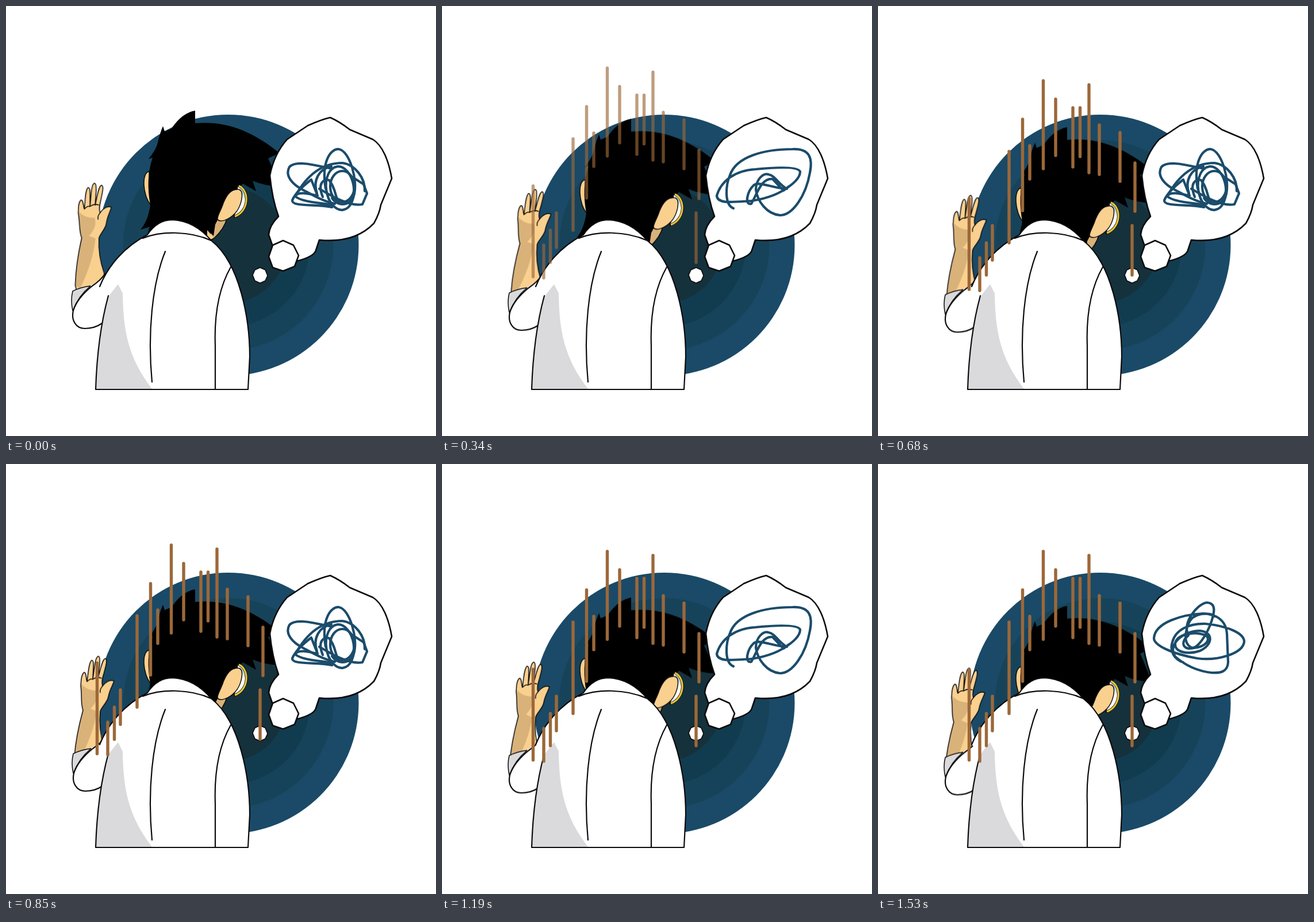
Animation of 748x748 px, one loop 1700 ms. Source, as an HTML page:

```html
<!DOCTYPE html>
<html lang="en">
<head>
<meta charset="utf-8">
<title>Confused thoughts</title>
<style>
  html, body { margin: 0; width: 100%; height: 100%; overflow: hidden; background: #fff; }
  svg { display: block; width: 100%; height: 100%; }
  .ink { stroke: #0b0b0d; stroke-width: 2.2; stroke-linecap: round; stroke-linejoin: round; }
  .thin { stroke-width: 1.5; }
  .skin { fill: #fad08f; }
  .shade { fill: #d9b27a; }
  .grey { fill: #dadadc; }
  .white { fill: #fff; }
  .open { fill: none; }
  .bubble { fill: #fff; stroke-width: 2.6; }
  .dot { stroke-width: 1.6; }
  .rim { stroke-width: 4.6; }
  .scribble { fill: none; stroke: #1b4c6b; stroke-width: 4.2; stroke-linecap: round; stroke-linejoin: round; opacity: 0; }
  .rain { stroke: #9c6839; stroke-width: 5.4; stroke-linecap: round; }

  .head, .sleeve, .forearm, .rain, .scribble { animation: 1700ms infinite; }
  .head { animation-name: sink; animation-timing-function: steps(10); }
  .sleeve { animation-name: sag; }
  .forearm { animation-name: slide; transform-origin: 145px 490px; }
  .rain { animation-name: fall, appear; }
  .scribble { animation-timing-function: step-end; }
  .knot { animation-name: knot; }
  .orbit { animation-name: orbit; }
  .loop { animation-name: loop; }
  .swirl { animation-name: swirl; }

  @keyframes sink { to { transform: translateY(72px); } }
  @keyframes sag {
    0% { transform: none; animation-timing-function: step-end; }
    10% { transform: translate(1px, 1.5px); animation-timing-function: steps(9); }
    100% { transform: translate(1px, 16px); }
  }
  @keyframes slide {
    0% { transform: translate(-.5px, -5px) rotate(-2.7deg); animation-timing-function: step-end; }
    10% { transform: translate(0, 0) rotate(0deg); animation-timing-function: steps(9); }
    100% { transform: translate(-4.8px, 46px) rotate(0deg); }
  }
  @keyframes fall {
    0% { transform: translateY(0); animation-timing-function: step-end; }
    10% { transform: translateY(0); animation-timing-function: steps(5); }
    60%, 100% { transform: translateY(55px); }
  }
  @keyframes appear {
    0% { opacity: 0; animation-timing-function: step-end; }
    10% { opacity: .3; animation-timing-function: step-end; }
    20% { opacity: .65; animation-timing-function: step-end; }
    30%, 100% { opacity: 1; }
  }
  @keyframes knot { 0%, 40% { opacity: 1; } 10%, 60%, 100% { opacity: 0; } }
  @keyframes orbit { 0%, 20%, 70% { opacity: 0; } 10%, 60%, 90%, 100% { opacity: 1; } }
  @keyframes loop { 0%, 30%, 80%, 100% { opacity: 0; } 20%, 70% { opacity: 1; } }
  @keyframes swirl { 0%, 40%, 90%, 100% { opacity: 0; } 30%, 80% { opacity: 1; } }
</style>
</head>
<body>
<svg viewBox="0 0 748 748">
  <g>
    <circle cx="386.500" cy="416" r="227" fill="#1a4a67"/>
    <circle cx="386.500" cy="416" r="183" fill="#17435a"/>
    <circle cx="386.500" cy="416" r="142" fill="#113c4f"/>
    <circle cx="386.500" cy="416" r="101" fill="#15313c"/>
  </g>

  <g class="head">
    <path class="ink thin skin" d="M249 288C236 289 237 329 252 346Z"/>
    <path class="ink thin shade" d="M366 366L384 370Q380 387 362 404L350 410Z"/>
    <path d="M329 182V204C379 199 428 216 476 256L456 265Q466 286 475 314Q450 313 429 304L435 322L412 309L404 318L380 350L364 380L361 400L350 389L350 410L300 430L246 398L250 384L234 389Q247 374 251 346C246 318 246 290 255 264L248 266Q260 251 263 241Q268 220 273 209L276 218L288 213Q306 186 329 182Z"/>
    <path class="skin" d="M350 390L361 403L350 408Z"/>
    <path class="ink thin white" d="M403 312C423 316 424 359 397 367Z"/>
    <path fill="#b5d5e0" d="M404 314Q415 320 416 337L410 324Z"/>
    <path class="ink open rim" d="M405 313C424 321 423 357 398 366"/>
    <path class="open" stroke="#f3c834" stroke-width="3" d="M405 313C424 321 423 357 398 366"/>
    <path class="ink thin skin" d="M403 319C391 319 384 328 378 343C374 356 367 365 368 371C372 377 387 373 399 360C408 350 412 333 410 324Q408 319 403 319Z"/>
  </g>

  <g class="forearm">
    <path class="skin" d="M124 505L121 490C123 460 130 430 136 408C132 395 134 385 133 375C131 362 133 345 138 342C142 342 141 352 143 358C145 345 146 325 151 321C156 321 154 332 153 354C156 335 157 314 163 314C167 315 165 330 162 352C167 335 170 318 175 318C179 320 176 330 172 345C170 352 168 358 170 366C176 358 184 354 190 357C188 365 182 372 180 385C178 395 168 402 166 410C164 430 166 450 172 470L178 510Z"/>
    <path class="shade" d="M133 362Q143 374 160 374Q165 389 149 405L160 410Q154 450 129 496L121 490C123 460 130 430 136 408Q132 385 133 362Z"/>
    <path class="ink thin open" d="M124 505L121 490C123 460 130 430 136 408C132 395 134 385 133 375C131 362 133 345 138 342C142 342 141 352 143 358C145 345 146 325 151 321C156 321 154 332 153 354C156 335 157 314 163 314C167 315 165 330 162 352C167 335 170 318 175 318C179 320 176 330 172 345C170 352 168 358 170 366C176 358 184 354 190 357C188 365 182 372 180 385C178 395 168 402 166 410C164 430 166 450 172 470L178 510M143 358Q149 352 153 354Q160 349 168 352M170 366Q165 371 166 377"/>
  </g>

  <g class="sleeve">
    <path class="white" d="M116 496L146 487L174 470L182 545L166 553Q152 562 137 561C110 558 111 525 116 496Z"/>
    <path class="ink thin grey" d="M116 496Q130 489 147 487Q126 504 116 530Q112 512 116 496Z"/>
    <path class="ink open" d="M172 466Q166 476 150 487Q124 508 117 530C113 547 122 561 137 561Q154 561 167 552"/>
  </g>

  <g>
    <path class="white" d="M156 667C158 605 166 548 178 504L163 488C177 453 205 419 246 398Q263 372 290 372Q328 374 357 408C407 447 424 545 424 610L421 667Z"/>
    <path class="grey" d="M195 484L203 500C204 562 211 610 254 666H157C159 604 167 548 179 504Z"/>
    <path class="ink open" d="M178 504C166 548 158 605 156 667H421L424 610C424 545 407 447 357 408Q328 374 290 372Q263 372 246 398C205 419 177 453 163 488M238 404C270 391 320 391 357 408M277 427C254 483 246 570 254 654M391 454C370 491 362 540 364 592V667"/>
  </g>

  <g>
    <path class="ink bubble" d="M564 194Q550 197 525 208L489 232Q466 258 459 295Q463 336 474 366Q458 382 457 398L464 418L505 444Q536 436 539 425L545 407C585 411 618 401 640 378Q650 360 652 346L671 300C666 270 655 242 638 232L598 215Q580 201 564 194Z"/>
    <path class="ink bubble" d="M482 408L500 416L509 434L502 453L482 461L464 455L457 436L464 416Z"/>
    <path class="ink bubble dot" d="M442 455L451 459L455 469L451 478L442 482L433 478L429 468L433 459Z"/>
  </g>

  <g class="scribble knot">
    <path d="M568 283C540 278 505 267 493 280C484 296 500 311 515 319C532 328 552 340 572 344"/>
    <path d="M567 350C540 344 497 350 498 338C503 326 518 312 531 302L542 330C525 326 508 322 503 331C515 341 545 342 566 346"/>
    <path d="M503 331C520 300 545 273 585 273C608 276 625 300 624 322"/>
    <path d="M556 318C548 270 565 248 579 249C598 252 613 305 605 330C598 349 576 349 567 334"/>
    <path d="M600 296L622 310L628 326L620 345C603 348 588 340 573 334L545 318"/>
    <path d="M541 326C533 303 545 283 566 279M551 332C541 308 553 300 562 303C575 318 572 336 580 341"/>
    <ellipse cx="581" cy="317" rx="24" ry="38" transform="rotate(-8 581 317)"/>
    <ellipse cx="585" cy="314" rx="21" ry="27"/>
  </g>
  <path class="scribble orbit" d="M531 345C515 340 507 325 512 310C517 289 540 277 570 278C610 282 637 295 637 309C635 330 590 343 555 338C510 330 480 315 480 303C482 275 530 262 565 260C598 262 606 280 607 295L609 345C608 362 595 364 580 363C555 360 534 350 517 335C503 315 530 290 560 290C585 293 582 315 560 325C540 332 515 328 517 312C520 296 550 290 570 298C580 305 570 318 550 320C530 325 525 310 540 298C528 278 555 243 572 241C590 242 585 260 578 280C565 310 550 325 543 318C531 310 535 291 540 278C548 257 575 259 584 263"/>
  <path class="scribble loop" d="M507 352C490 345 494 310 501 294C512 262 560 249 610 249C640 248 645 265 640 290C633 330 610 364 588 364C565 362 549 340 546 320C546 300 560 290 568 293C580 295 585 310 600 318C575 317 553 305 543 311C530 323 526 347 538 344C547 330 555 298 575 301L594 321C610 310 623 300 623 288C619 278 575 281 545 284C509 286 485 305 478 330C479 345 506 341 538 339C567 335 590 325 603 314"/>
  <g class="scribble swirl">
    <path d="M584 343C550 346 500 330 498 298C498 265 520 250 540 252C575 258 620 280 620 303C618 328 590 333 560 331C530 328 518 312 521 297C525 270 545 249 568 249C598 250 612 280 610 303C606 322 580 327 555 325C530 320 520 305 528 294C540 284 572 290 572 306L566 305"/>
    <path d="M521 300C528 330 536 350 548 355L584 342M524 270C545 255 592 264 606 304M521 299C538 270 580 270 606 300"/>
  </g>

  <path class="rain" d="M287.500 97V250M251.500 164V323M309 129V227M228 220V379M264 210V268M339 144V247M351.500 144V229M367 104V257M385 174V260M421 187V272M447 240V324M442 349V435M158.500 302V460M177 405V462M188.500 379V435M199 349V409"/>
</svg>
</body>
</html>
```
